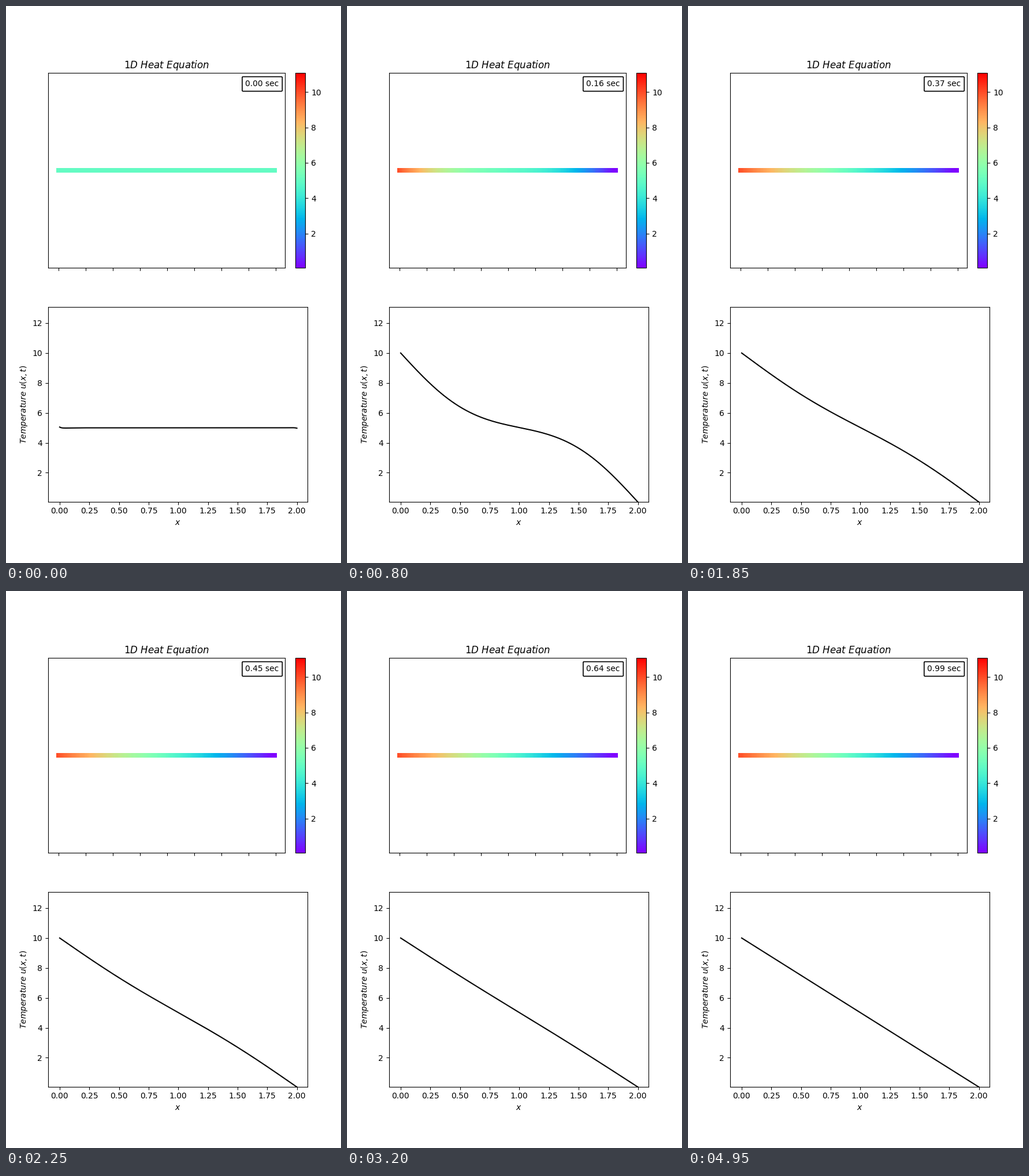
Write a matplotlib script that moves like this. It is 580 px wide and 966 px high and loops after 5000 ms.

```python
import numpy as np
import matplotlib.pyplot as plt
from matplotlib.animation import FuncAnimation

FRAMES, INTERVAL, DT = 100, 50, 0.01
ALPHA = 2 / 3
U_MIN, U_MAX = 0.06, 10.09

x = np.linspace(0, 2, 201)
modes = np.arange(1, 81)
waves = np.sin(np.pi * np.outer(x, modes)) / modes


def ripple(d):
    """Small wiggle of the starting profile at distance d from an end."""
    return 0.11 * np.exp(-d / 0.018) - 0.06 * np.exp(-d / 0.05)


def temperature(t):
    """Rod at 5 degrees whose ends are held at 10 and 0 once t > 0."""
    if t == 0:
        return 5 + ripple(x) - 0.5 * ripple(2 - x)
    decay = np.exp(-ALPHA * (np.pi * modes) ** 2 * t)
    steady = 10 - 4.98 * x
    return steady - 10 / np.pi * waves @ decay


plt.rcParams["font.family"] = "DejaVu Sans"
fig, (rod_ax, plot_ax) = plt.subplots(2, 1, sharex=True, figsize=(5.8, 9.66), dpi=100)

u0 = temperature(0)
rod = rod_ax.scatter(x[:-1], np.zeros(len(x) - 1), c=u0[:-1], marker="s", s=36,
                     linewidths=0, cmap="rainbow", vmin=U_MIN, vmax=U_MAX + 1)
rod_ax.set_ylim(-1, 1)
rod_ax.set_yticks([])
rod_ax.set_title(r"$1D\ Heat\ Equation$")
fig.colorbar(rod, ax=rod_ax, fraction=0.046, pad=0.04)
clock = rod_ax.text(0.9033, 0.943, "", transform=rod_ax.transAxes, ha="center", va="center",
                    bbox=dict(boxstyle="round,pad=0.4,rounding_size=0.1",
                              fc="white", ec="black", lw=1.2))

line, = plot_ax.plot(x, u0, color="black", lw=1.5)
plot_ax.set_xlim(-0.0995, 2.0895)
plot_ax.set_ylim(U_MIN, U_MAX + 3)
plot_ax.set_xlabel("$x$")
plot_ax.set_ylabel(r"$Temperature\ u(x,t)$")


def update(i):
    t = i * DT
    u = temperature(t)
    rod.set_array(u[:-1])
    line.set_ydata(u)
    clock.set_text(f"{t:.2f} sec")
    return rod, line, clock


anim = FuncAnimation(fig, update, frames=FRAMES, interval=INTERVAL, repeat=True, repeat_delay=0)
plt.show()
```
